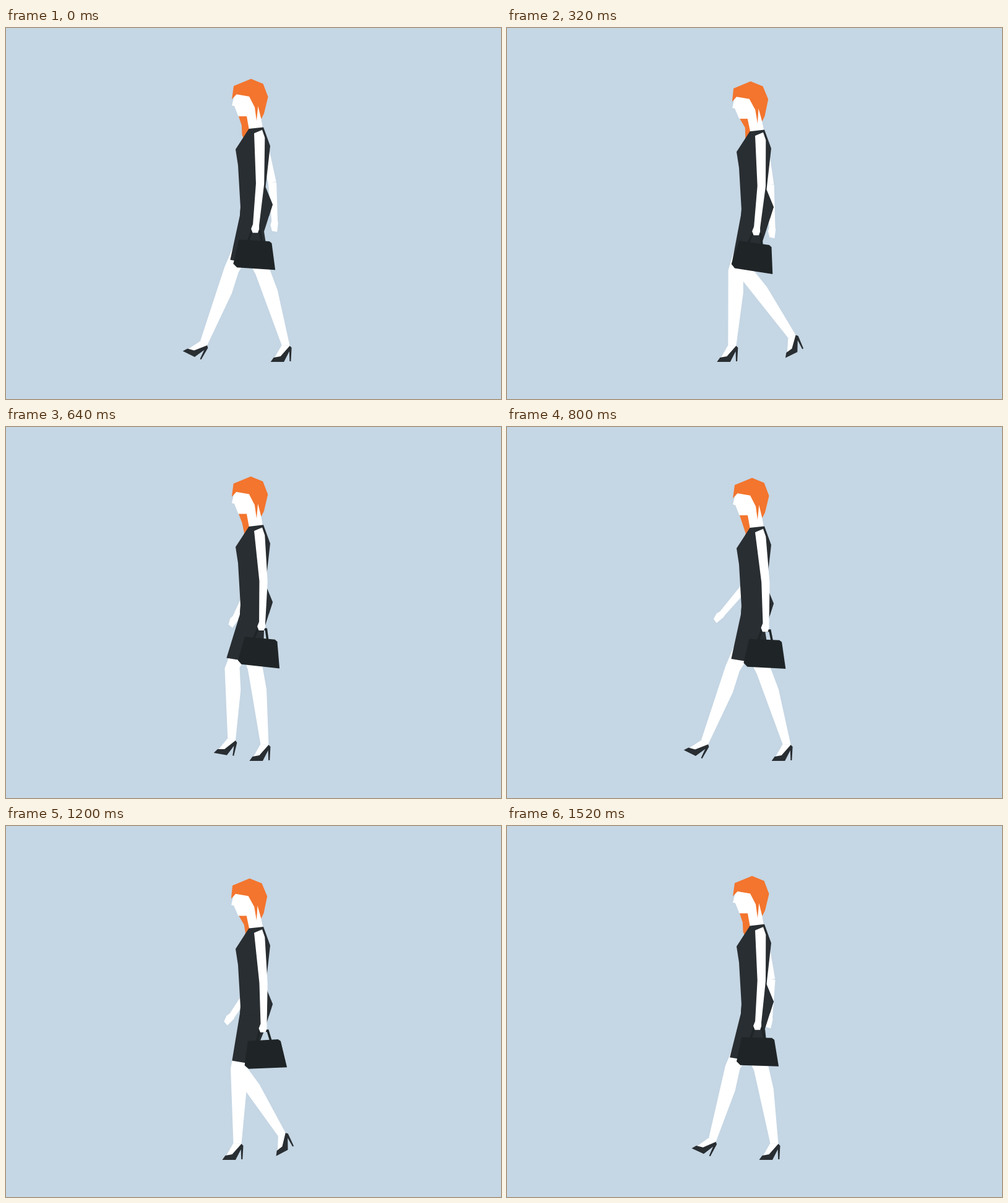
Recreate the animation shown at these times as an HTML page with a canvas. Size 800x600 px, loop 1600 ms.

```html
<!DOCTYPE html>
<html lang="en">
<head>
<meta charset="utf-8">
<title>Walk cycle</title>
<style>
  html, body { margin: 0; width: 100%; height: 100%; overflow: hidden; background: #c5d6e4; }
  canvas { display: block; width: 800px; height: 600px; }
</style>
</head>
<body>
<canvas id="stage" width="800" height="600"></canvas>
<script>
const ctx = document.getElementById('stage').getContext('2d');
const SKY = '#c5d6e4', SKIN = '#fff', HAIR = '#f3752e', DRESS = '#292e32', BAG = '#1f2527';
const STEP = 80, STEPS = 20;

// Sum of cosines: each term is [cycles per loop, amplitude, step of its peak].
function wave(step, mean, ...terms) {
  return terms.reduce((v, [n, amp, peak]) =>
    v + amp * Math.cos(2 * Math.PI * n * (step - peak) / STEPS), mean);
}

function poly(color, points) {
  ctx.fillStyle = color;
  ctx.beginPath();
  points.forEach(p => ctx.lineTo(p[0], p[1]));
  ctx.closePath();
  ctx.fill();
}

function at(x, y, angle, draw) {
  ctx.save();
  ctx.translate(x, y);
  ctx.rotate(angle);
  draw();
  ctx.restore();
}

// Returns a mapper for offsets along and across the line from a to b.
function frame(a, b) {
  const len = Math.hypot(b[0] - a[0], b[1] - a[1]);
  const dx = (b[0] - a[0]) / len, dy = (b[1] - a[1]) / len;
  return (o, along, across) => [o[0] + along * dx + across * dy, o[1] + along * dy - across * dx];
}

// The foot stays flat on the ground, then lifts, dips its toe and lands on the heel.
function legPose(step) {
  const u = Math.min(1, (step + 10) % STEPS / 11.5);
  return {
    knee: [
      wave(step, 372.1, [1, 25.4, 10.35], [2, 6.5, .45]),
      wave(step, 395.1, [1, 7.9, 12.4], [2, 3.8, 3.5])
    ],
    x: wave(step, 405.4, [1, 70.7, 11.68], [2, 14.5, 4.7], [3, 5.7, 3.33], [4, 2.3, 1.78], [6, 2.6, .33]),
    y: 514 - 520 * u ** 2 * (1 - u) ** 3,
    angle: -.49 * Math.sin(2 * Math.PI * u ** 1.6)
  };
}

function leg({ knee, x, y, angle }) {
  const c = Math.cos(angle), s = Math.sin(angle);
  const ankle = [x - 13 * c + s, y - 13 * s - c];
  const on = frame(knee, ankle);
  poly(SKIN, [[373, 340], knee, ankle, [x, y], on(knee, 36, 24.3), on(knee, 0, 24), [410, 340]]);
  at(x, y, angle, () => poly(SKIN, [[-13, -1], [-25, 20], [-14, 19], [1, 3], [0, 0]]));
}

function shoe({ x, y, angle }) {
  at(x, y, angle, () => poly(DRESS, [
    [-31, 26], [-26, 19], [-15, 17], [0, 0], [3, 3],
    [1.8, 25], [-.3, 25], [-.8, 9], [-9.5, 26]
  ]));
}

function farArm(step) {
  const top = [415, 180];
  const elbow = [wave(step, 411, [1, 21, 1.3]), 249.5];
  const wrist = [wave(step, 391, [1, 50, 1.7]), wave(step, 308.5, [1, 9, 3], [2, 2.5, 6])];
  const up = frame(top, elbow), low = frame(elbow, wrist);
  poly(SKIN, [up(top, 0, -6.5), up(elbow, 0, -6.5), up(elbow, 0, 6.5), up(top, 0, 6.5)]);
  poly(SKIN, [
    low(elbow, 0, -6.5), low(wrist, 0, -4.8), low(wrist, 6, -7), low(wrist, 16, -5),
    low(wrist, 18, 3), low(wrist, 4, 5.5), low(wrist, 0, 5), low(elbow, 0, 6.8)
  ]);
}

function looseHair(step) {
  const bend = [wave(step, 382.8, [2, 2.1, 4.5]), 157];
  const end = [wave(step, 385, [1, 2.2, 11], [2, 1.6, 4]), wave(step, 172.5, [1, 2, 4])];
  poly(HAIR, [[375.5, 141], bend, end, [384, 178], [394, 168], [394, 163], [390, 141]]);
}

// The head leans from the neck up.
function head(step) {
  const lean = wave(step, -.9, [2, 1, 9.5]) / 55;
  ctx.save();
  ctx.transform(1, 0, -lean, 1, 150 * lean, 0);
  poly(SKIN, [
    [371, 106], [392, 108], [408, 122], [415, 162], [393, 165], [389, 142.5],
    [375.5, 142.5], [369, 126], [365, 125], [368, 113]
  ]);
  poly(HAIR, [
    [368, 93.5], [396, 82], [415.5, 90], [423.5, 111], [417, 138], [412.5, 147],
    [407.3, 126], [405, 150], [402, 128], [393, 110.5], [372.5, 107], [365, 115]
  ]);
  ctx.restore();
}

function torso() {
  poly(DRESS, [
    [392.5, 162.8], [416, 160.2], [427, 190.5], [419.5, 257], [431, 285],
    [425, 304], [378, 304], [379, 291], [375, 222], [371, 196]
  ]);
}

function skirt(step, bob) {
  const x = wave(step, 360.3, [4, 3.6, 4.9], [2, 1.7, 4.2]);
  const y = wave(step, 376.3, [2, 2.8, 4], [4, 1, 4.7]);
  const back = wave(step, 411, [2, 14.8, 0]);
  poly(DRESS, [
    [379, 288 + bob], [431, 285 + bob], [417, 329 + bob],
    [back, y + (back - x) / 6], [x, y], [378, 303]
  ]);
}

function bag(x, y, angle) {
  at(x, y, angle, () => {
    ctx.strokeStyle = BAG;
    ctx.lineWidth = 3.6;
    ctx.beginPath();
    ctx.moveTo(-11.5, 17);
    ctx.lineTo(-7, 2);
    ctx.lineTo(6.5, 1);
    ctx.lineTo(10.5, 17);
    ctx.stroke();
    poly(BAG, [[-26.5, 16.3], [22.5, 15.8], [26.6, 18.7], [35, 61.5], [-27, 61.4], [-33.3, 55.6]]);
  });
}

function nearArm(step) {
  const e = wave(step, 407.6, [1, 4.1, 11.5]);
  const w = wave(step, 406.3, [1, 8.9, 12]);
  bag(w + 5, 327.5, wave(step, .057, [1, .1, 4.8]));
  poly(SKIN, [
    [401, 170], [414, 164.5], [418.3, 177], [e + 13.3, 252], [w + 10, 319], [w + 10, 325],
    [w + 8, 331], [w - .5, 331], [w - 3, 324.5], [w, 317], [e, 251]
  ]);
}

function draw(step) {
  const bob = wave(step, 1.5, [2, 3.4, 3.1]);
  const bobbed = (...parts) => at(0, bob, 0, () => parts.forEach(part => part(step)));
  const legs = [legPose(step), legPose(step + STEPS / 2)];

  ctx.fillStyle = SKY;
  ctx.fillRect(0, 0, 800, 600);
  bobbed(farArm, looseHair);
  legs.forEach(leg);
  legs.forEach(shoe);
  skirt(step, bob);
  bobbed(head, torso, nearArm);
}

function tick() {
  draw(Math.floor(performance.now() / STEP) % STEPS);
  requestAnimationFrame(tick);
}
tick();
</script>
</body>
</html>
```
